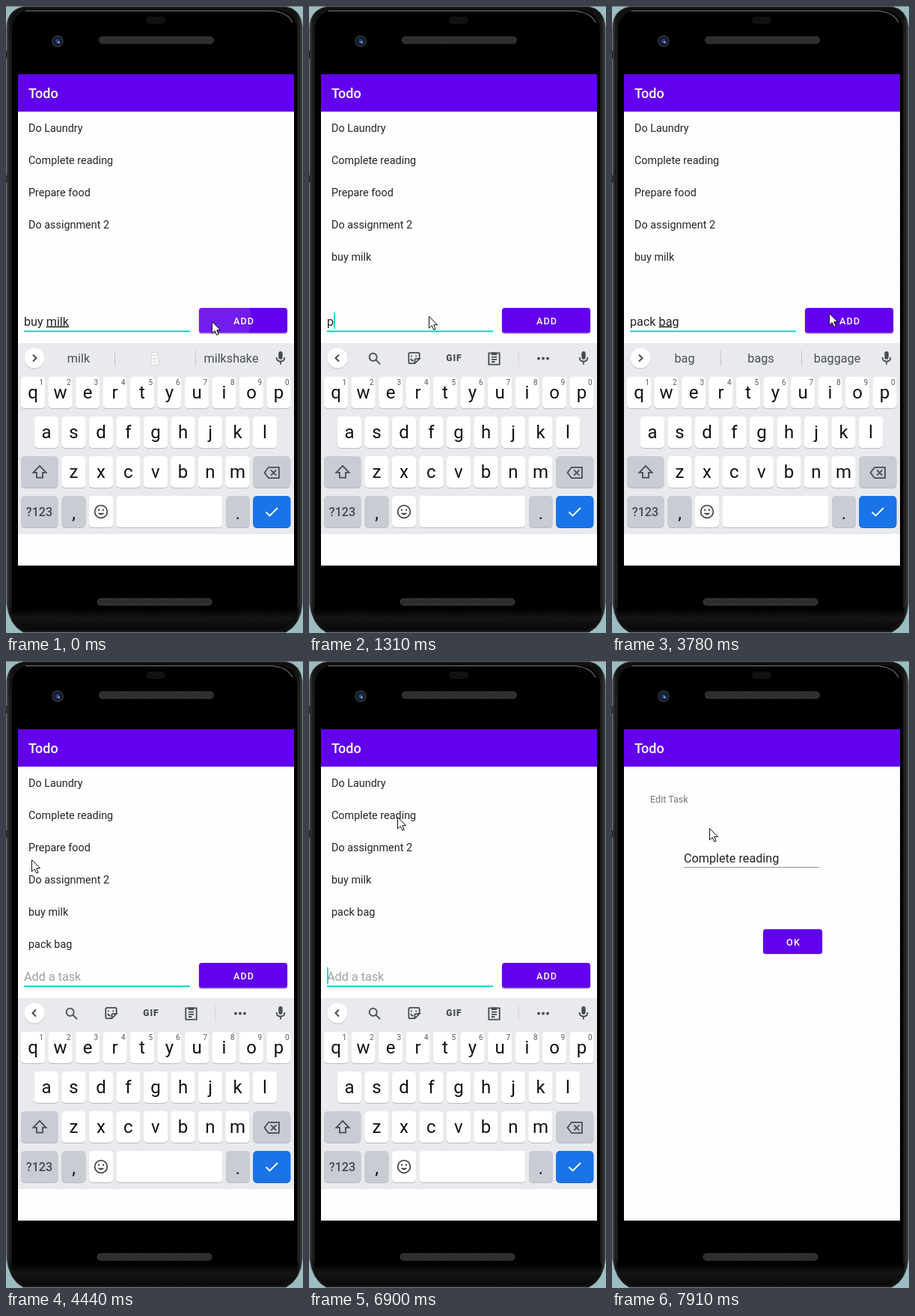
These frames come from a looping animation (397 px wide and 837 px high, 8000 ms). An HTML page:

```html
<!DOCTYPE html>
<html lang="en">
<head>
<meta charset="utf-8">
<title>Todo app</title>
<style>
  html, body { margin: 0; width: 100%; height: 100%; overflow: hidden; background: #000; }
  svg { display: block; width: 100vw; height: 100vh; }
  text { font-family: Roboto, "Noto Sans", sans-serif; white-space: pre; }
  .mid { text-anchor: middle; }
  .item { font-size: 14.4px; fill: #242424; }
  .field { font-size: 16.2px; fill: #242424; text-decoration-skip-ink: none; }
  .button { font-size: 12.6px; font-weight: 500; letter-spacing: 1.12px; fill: #fff; text-anchor: middle; }
  .letter { font-size: 24px; fill: #111; text-anchor: middle; }
  .digit { font-size: 10px; fill: #55585d; text-anchor: middle; }
  .word { font-size: 16.2px; fill: #4b4e53; text-anchor: middle; }
  .line { fill: none; stroke: #484b50; stroke-width: 2; }
</style>
</head>
<body>
<svg viewBox="0 0 397 837" preserveAspectRatio="none">
  <defs>
    <linearGradient id="rim">
      <stop offset="0" stop-color="#4a4a4a"/><stop offset=".008" stop-color="#1b1b1b"/>
      <stop offset=".02" stop-color="#111"/><stop offset=".98" stop-color="#111"/>
      <stop offset=".992" stop-color="#242424"/><stop offset="1" stop-color="#4a4a4a"/>
    </linearGradient>
    <linearGradient id="chin" x2="0" y2="1">
      <stop offset="0" stop-color="#000"/><stop offset=".45" stop-color="#151515"/>
      <stop offset="1" stop-color="#080808"/>
    </linearGradient>
    <pattern id="mesh" width="3" height="3" patternUnits="userSpaceOnUse">
      <path d="M0 3L3 0" stroke="#4a4a4a" stroke-width=".8"/>
    </pattern>
    <clipPath id="screenClip"><rect x="16" y="91" width="369" height="656"/></clipPath>
    <clipPath id="addClip"><rect x="258" y="403" width="118" height="33.5" rx="3.5"/></clipPath>
  </defs>

  <g id="phone">
    <rect width="397" height="837" fill="#9bbcc0"/>
    <path d="M0 .5H397" stroke="#777"/>
    <path d="M1 28Q2 5 24 1H374Q394 4 396 28V797Q394 826 374 836H23Q4 826 1 797Z" fill="url(#rim)" stroke="#383838"/>
    <path d="M8 34Q8 6 36 6H361Q389 6 389 34V806H8Z" fill="#000"/>
    <path d="M6 804H391Q390 825 369 833H28Q8 825 6 804Z" fill="url(#chin)"/>
    <path d="M26 6.5H352Q376 7 383 22" fill="none" stroke="#777" stroke-width="1.2"/>
    <path d="M6 42V800M391 42V800" stroke="#272727"/>
    <path d="M.5 60V70M.5 226V236" stroke="#222" stroke-width="2"/>
    <rect x="187" y="14" width="26" height="10" rx="5" fill="#111"/>
    <circle cx="69" cy="47" r="8" fill="#292b2f"/>
    <circle cx="69" cy="47" r="5.5" fill="#11182a"/>
    <circle cx="69" cy="47" r="3" fill="#29447e"/>
    <circle cx="70.5" cy="48.5" r="1.5" fill="#8499cf"/>
  </g>

  <g clip-path="url(#screenClip)">
    <rect x="16" y="91" width="369" height="656" fill="#fefefe"/>
    <g id="home">
      <rect id="rowPress" x="16" y="184" width="369" height="43" fill="#e2e2e2"/>
      <g id="list"></g>
      <text id="input" class="field" x="24" y="426.5"></text>
      <rect x="24" y="433.3" width="222" height="2" fill="#03dac5"/>
      <rect id="caret" y="409" width="1.8" height="22" fill="#03dac5"/>
      <rect x="257.5" y="404" width="119" height="34.2" rx="4" fill="#000" opacity=".18"/>
      <rect x="258" y="403" width="118" height="33.5" rx="3.5" fill="#6200ee"/>
      <g clip-path="url(#addClip)"><circle id="ripple" cy="420" fill="#fff"/></g>
      <text class="button" x="318" y="424.5">ADD</text>
      <g id="keyboard"></g>
    </g>
    <g id="edit">
      <rect x="16" y="91" width="369" height="680" fill="#fefefe"/>
      <text x="51" y="189" font-size="12.6" fill="#777">Edit Task</text>
      <text class="field" x="96" y="269">Complete reading</text>
      <path d="M96 275.5H277" stroke="#929292"/>
      <rect x="202" y="359" width="79.5" height="33" rx="4" fill="#000" opacity=".15"/>
      <rect x="202" y="358" width="79" height="33" rx="3.5" fill="#6200ee"/>
      <text class="button" x="242.5" y="379.5">OK</text>
    </g>
    <rect x="16" y="91" width="369" height="50" fill="#6200ee"/>
    <text x="30" y="123" font-size="18" font-weight="500" fill="#fff">Todo</text>
  </g>
  <path id="mouse" d="M.5.5V16L4.2 12.6L6.8 18.3L9.2 17.2L6.7 11.7H11.6Z" fill="#fff" stroke="#111"/>
</svg>
<script>
const LOOP = 8000;
const $ = id => document.getElementById(id);
const show = (el, on) => el.setAttribute('visibility', on ? 'visible' : 'hidden');
const set = (el, attrs) => { for (const k in attrs) el.setAttribute(k, attrs[k]); };

const label = (cls, x, y, s) => `<text class="${cls}" x="${x}" y="${y}">${s}</text>`;
const icon = (x, y, body, scale = 0.9) =>
  `<g class="line" transform="translate(${x} ${y}) scale(${scale}) translate(-12 -12)">${body}</g>`;
const key = (x, y, w, fill = '#fff', edge = '#b9bbc0') =>
  `<rect x="${x}" y="${y + 1}" width="${w}" height="42" rx="5" fill="${edge}"/>` +
  `<rect x="${x}" y="${y}" width="${w}" height="42" rx="5" fill="${fill}"/>`;
const speaker = (x, y) => ['#242424" stroke="#3b3b3b', 'url(#mesh)'].map(fill =>
  `<rect x="${x}" y="${y}" width="153" height="9" rx="4.5" fill="${fill}"/>`).join('');

function keyboard() {
  const gray = '#c9ccd3';
  let s = '<rect x="16" y="450" width="369" height="255" fill="#e8eaed"/>' +
    '<circle cx="38" cy="471" r="13.7" fill="#c8cace"/><circle cx="38" cy="470" r="13.5" fill="#fff"/>' +
    '<path id="chevron" class="line"/>';

  s += '<g id="tools">' +
    icon(87.5, 470.5, '<circle cx="10" cy="10" r="5.6"/><path d="M14 14L20.5 20.5"/>') +
    icon(140.5, 470, '<path d="M20 13V6Q20 4 18 4H6Q4 4 4 6V18Q4 20 6 20H13L20 13H15Q13 13 13 15V20M7 13Q8 16 11 16M8 8V10M15 8V10"/>') +
    '<text class="mid" x="194" y="474.3" font-size="12" font-weight="900" letter-spacing="1" fill="#484b50">GIF</text>' +
    icon(247.5, 470.5, '<path d="M4 4H20V21H4ZM8 10H16M8 13.5H16M8 17H13"/><path d="M8 5H16" stroke-width="4"/>') +
    '<path d="M280 460V481" stroke="#d1d4d8"/>' +
    [307, 313, 319].map(x => `<circle cx="${x}" cy="470.5" r="1.9" fill="#484b50"/>`).join('') + '</g>';

  s += '<g id="words"><path d="M145.5 460V481M253.5 460V481" stroke="#c3c6ca"/>' +
    [97, 199, 301].map(x => label('word', x, 476, '')).join('') +
    '<g id="glass"><path d="M194.5 462.5H203V470H204V479H194V470H195Z" fill="#fff" stroke="#d2d4d7"/>' +
    '<path d="M196 466H202M196 471H202M196 475H202" stroke="#c5c7ca"/></g></g>';

  s += icon(367, 470, '<path d="M12 5V11" stroke-width="6" stroke-linecap="round"/>' +
    '<path d="M6 11Q6 17 12 17T18 11M12 17V21.5"/>');

  ['qwertyuiop', 'asdfghjkl', 'zxcvbnm'].forEach((row, r) => [...row].forEach((c, i) => {
    const x = [36, 54, 90.4][r] + i * 36.5, y = [495, 548, 601][r];
    s += key(x - 16.2, y, 32.4) + label('letter', x, y + 29, c);
    if (!r) s += label('digit', x + 11.3, 506, (i + 1) % 10);
  }));

  s += key(20, 601, 49.5, gray) + key(330.3, 601, 50, gray) +
    icon(45, 622, '<path d="M12 3L2.5 13H7.5V20.5H16.5V13H21.5Z"/>') +
    icon(355, 623, '<path d="M7.5 4H23V20H7.5L1.5 12ZM11 8L19 16M19 8L11 16"/>');

  s += key(20, 654, 49.5, gray) + key(74.5, 654, 32, gray) + key(110.9, 654, 32.2) +
    key(147.3, 654, 142) + key(294, 654, 32, gray) + key(330.3, 654, 50, '#1a73e8', '#1764c8') +
    '<text class="mid" x="44.5" y="681" font-size="16.2" font-weight="500" fill="#45484d">?123</text>' +
    label('letter', 90.5, 685, ',') + label('letter', 310, 685, '.') +
    icon(127, 675, '<circle cx="12" cy="12" r="9.3"/><path d="M7 14Q12 20 17 14Z" fill="#484b50" stroke="none"/>' +
      '<path d="M8.7 8V11M15.3 8V11"/>') +
    '<path d="M347.5 675.5L352.5 680.5L363 670" fill="none" stroke="#fff" stroke-width="1.9"/>';
  return s;
}

const ticks = [0, 150, 290, 440, 580, 720, 870, 1160, 1310, 1460, 1610, 1760,
  2190, 2340, 2490, 2640, 2790, 2930, 3200, 3480, 3640, 3780, 3910, 4050, 4180, 4310, 4440,
  4870, 4990, 5550, 5680, 5940, 6500, 6630, 6760, 6900, 7610, 7760, 7910];

// time, text, underlined range, suggestions
const typing = [
  [0, 'buy milk', 4, 8, 'milk,*,milkshake'],
  [150, '', 0, 0, ''],
  [1310, 'p', 0, 0, ''],
  [1460, 'p', 0, 1, 'p,pay,pm'],
  [1610, 'pa', 0, 2, 'pa,pay,pan'],
  [1760, 'pac', 0, 3, 'pac,pack,pace'],
  [2190, 'pack', 0, 4, 'pack,package,packing'],
  [2490, 'pack ', 0, 0, 'up,the,my'],
  [2640, 'pack b', 5, 6, 'b,by,but'],
  [2790, 'pack ba', 5, 7, 'ba,back,bag'],
  [2930, 'pack bag', 5, 7, 'ba,back,bag'],
  [3200, 'pack bag', 5, 8, 'bag,bags,baggage'],
  [4050, '', 0, 0, '']
];
typing.splice(7, 0, [2340, 'pack ', 0, 4, 'pack,package,packing']);

const mousePath = [[0, 275, 421], [290, 275, 421], [720, 162, 415], [870, 160, 414], [3200, 160, 414],
  [3780, 290, 410], [4050, 290, 410], [4440, 34, 265], [4870, 34, 265], [4990, 44, 254],
  [6500, 44, 254], [6900, 118, 208], [7610, 118, 208], [7910, 130, 223]];

const caretFlips = [290, 870, 1160, 3480, 4050, 4310, 4870, 5550, 5940, 6500, 6900];

const lastOf = (rows, t) => rows.filter(r => r[0] <= t).pop();

function mouseAt(t) {
  const i = mousePath.findIndex(p => p[0] > t);
  if (i < 0) return mousePath[mousePath.length - 1].slice(1);
  const [t0, x0, y0] = mousePath[i - 1], [t1, x1, y1] = mousePath[i];
  const u = (t - t0) / (t1 - t0), e = u * u * (3 - 2 * u);
  return [x0 + (x1 - x0) * e, y0 + (y1 - y0) * e].map(Math.round);
}

function tasksAt(t) {
  const tasks = ['Do Laundry', 'Complete reading', 'Prepare food', 'Do assignment 2'];
  if (t >= 150) tasks.push('buy milk');
  if (t >= 4050) tasks.push('pack bag');
  if (t >= 5680) tasks.splice(2, 1);
  return tasks;
}

$('phone').insertAdjacentHTML('beforeend', speaker(124.5, 41) + speaker(122, 791));
$('keyboard').innerHTML = keyboard();
const words = [...$('words').querySelectorAll('text')];
const pen = document.createElement('canvas').getContext('2d');

function drawInput(t) {
  const [, text, from, to, hints] = lastOf(typing, t);
  $('input').innerHTML = text
    ? `${text.slice(0, from)}<tspan text-decoration="underline">${text.slice(from, to)}</tspan>${text.slice(to)}`
    : '<tspan fill="#a0a0a0">Add a task</tspan>';
  pen.font = '16.2px Roboto, "Noto Sans", sans-serif';
  $('caret').setAttribute('x', 24 + pen.measureText(text).width);
  show($('caret'), caretFlips.filter(f => f <= t).length % 2);

  show($('tools'), !hints);
  show($('words'), hints);
  show($('glass'), hints.includes('*'));
  hints.split(',').forEach((w, i) => { words[i].textContent = w === '*' ? '' : w; });
  $('chevron').setAttribute('d', hints ? 'M36 465.5L40.5 470L36 474.5' : 'M40 465.5L35.5 470L40 474.5');
}

function drawRipple(t) {
  const age = t >= 3910 ? t - 3910 : t;
  const on = age < 300;
  set($('ripple'), { cx: 284 + age * 0.1, r: 44 + age * 0.25, opacity: on ? 0.11 * (1 - age / 300) : 0 });
}

function draw(time) {
  const t = ticks.filter(k => k <= time).pop();
  $('list').innerHTML = tasksAt(t).map((s, i) => label('item', 30, 168 + i * 43, s)).join('');
  drawInput(t);
  drawRipple(t);
  show($('rowPress'), t >= 7610);
  const open = Math.min(1, Math.max(0, (t - 7610) / 300));
  set($('edit'), { opacity: Math.min(1, open * 1.4), transform: `translate(0 ${(1 - open) * 20})` });
  $('mouse').setAttribute('transform', `translate(${mouseAt(t).join(' ')})`);
}

const start = performance.now();
function loop() {
  draw((performance.now() - start) % LOOP);
  requestAnimationFrame(loop);
}
loop();
</script>
</body>
</html>
```
